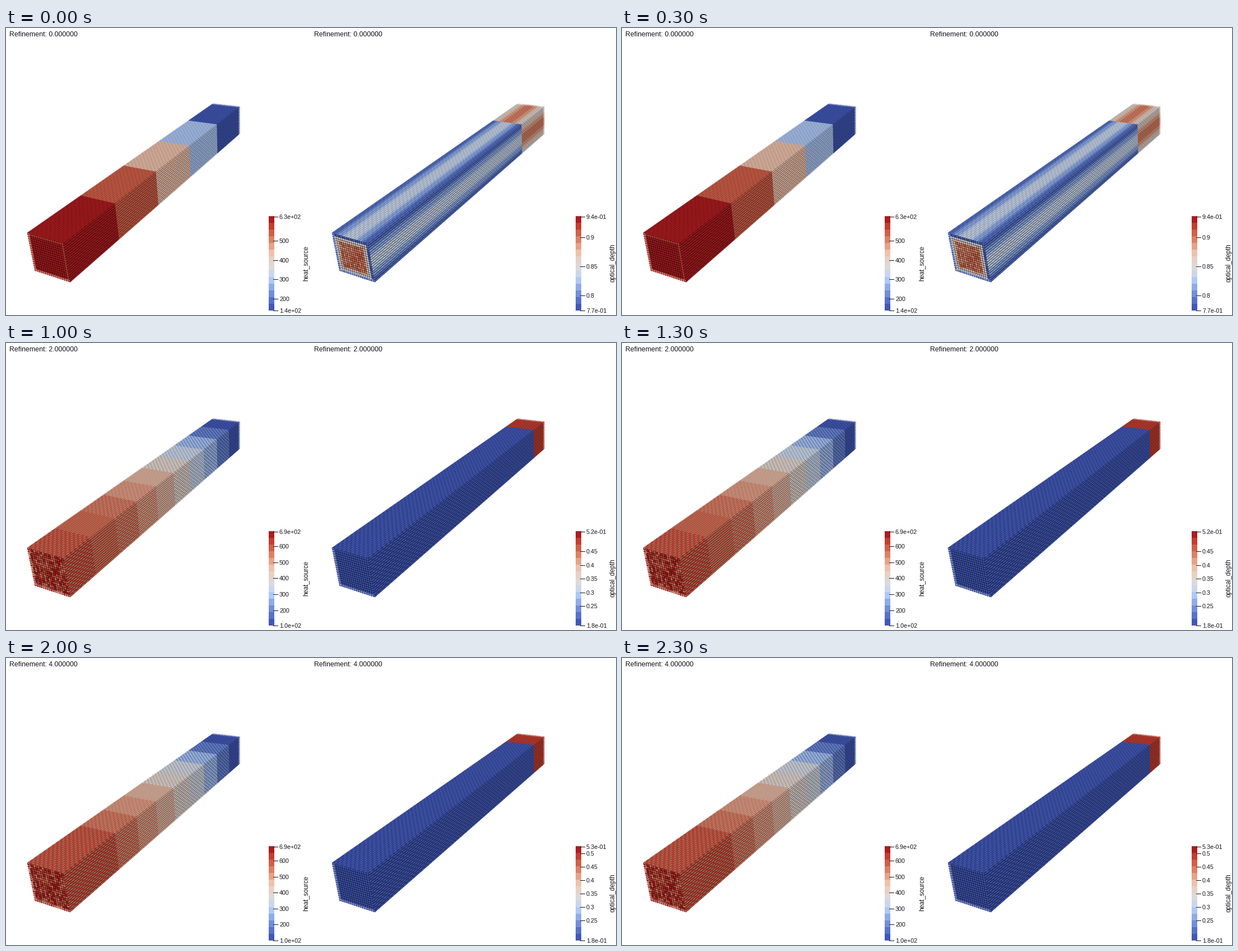
Recreate the animation shown at these times as a matplotlib script. Size 1089 by 514 pixels, loop 2.5 s.

```python
import numpy as np
import matplotlib.pyplot as plt
from matplotlib.animation import FuncAnimation
from matplotlib.patches import Rectangle

W, H, DPI = 1089, 514, 64
X0, X1, Y0, Y1 = 30, 426, 128, 462      # region holding one rod bundle
SS = 3                                  # supersampling
RODS, BANDS = 17, 14
PANEL_SHIFT = 544
INK = "#14141c"
plt.rcParams["font.family"] = "Liberation Sans"

ANCHORS = np.array([
    (66, 88, 182), (92, 122, 206), (132, 160, 224), (172, 200, 248),
    (208, 218, 234), (226, 216, 208), (240, 200, 180), (228, 160, 132),
    (215, 115, 88), (200, 72, 54), (172, 28, 32)]) / 255
PALETTE = np.stack([np.interp(np.linspace(0, 10, BANDS), np.arange(11), ANCHORS[:, k])
                    for k in range(3)], axis=1)

# (low, high, tick step) for each refinement level
HEAT_RANGE = [(139, 627, 100), (101, 639, 100), (104, 694, 100),
              (103, 691, 100), (100, 692, 100)]
DEPTH_RANGE = [(.774, .9365, .05), (.3745, .528, .02), (.1786, .5235, .05),
               (.1786, .5235, .05), (.1763, .527, .05)]
# normalised optical depth: (edge, centre) of body, (edge, centre) of tip, cap centre
DEPTH_LOOK = [((.08, .36), (.45, .75), .75), ((.1, .24), (.62, .74), .42),
              ((.03, .03), (.9, .9), .05)]


def fit_camera():
    """Projective camera from a few box points (x, y, z, px, py)."""
    points = [(0, 0, 0, 37, 367), (1, 0, 0, 103, 386), (1, 1, 0, 114, 456),
              (0, 1, 0, 51, 435), (0, 0, 1, 370, 135), (1, 0, 1, 418, 140),
              (1, 1, 1, 418, 189), (0, 0, .4, 210, 246), (1, 0, .4, 267, 257),
              (1, 1, .4, 272, 317)]
    rows, rhs = [], []
    for x, y, z, px, py in points:
        rows.append([x, y, z, 1, 0, 0, 0, 0, -px * x, -px * y, -px * z])
        rows.append([0, 0, 0, 0, x, y, z, 1, -py * x, -py * y, -py * z])
        rhs += [px, py]
    solved = np.linalg.lstsq(np.array(rows, float), np.array(rhs, float), rcond=None)[0]
    return np.append(solved, 1).reshape(3, 4)


def unproject(matrix):
    """Face coordinates for every sample, and the mask of samples on the face."""
    px = X0 + (np.arange((X1 - X0) * SS) + .5) / SS
    py = Y0 + (np.arange((Y1 - Y0) * SS) + .5) / SS
    gx, gy = np.meshgrid(px, py)
    inv = np.linalg.inv(matrix)
    a, b, w = (r[0] * gx + r[1] * gy + r[2] for r in inv)
    a, b = a / w, b / w
    mask = (a >= 0) & (a < 1) & (b >= 0) & (b < 1)
    return a[mask], b[mask], mask


camera = fit_camera()
cx, cy, cz, c1 = camera.T
FRONT = unproject(np.column_stack([cx, cy, c1]))
TOP = unproject(np.column_stack([cx, cz, c1]))
SIDE = unproject(np.column_stack([cy, cz, c1 + cx]))
CAP_NOISE = np.random.default_rng(4).uniform(-1, 1, (RODS, RODS))


def colour(n):
    return PALETTE[np.clip((n * BANDS).astype(int), 0, BANDS - 1)]


def heat(z, level):
    layers = 5 if level == 0 else 10
    centre = (np.floor(z * layers) + .5) / layers
    lo, hi, _ = HEAT_RANGE[level]
    n = (60 + 580 * np.cos(np.pi / 2 * centre) - lo) / (hi - lo)
    return np.clip(n, 0, 1) * (.93 if level < 2 else .9)


def depth(z, ring, level):
    layers = 5 if level == 0 else 10
    body, tip, _ = DEPTH_LOOK[min(level, 2)]
    t = np.clip(ring / 6, 0, 1)
    return np.where(z < 1 - 1 / layers, body[0] + (body[1] - body[0]) * t,
                    tip[0] + (tip[1] - tip[0]) * t)


def paint_length(image, face, kind, level, dark, gain):
    """Rods seen from the side: bright ridges, dark gaps, fine axial cells."""
    across, z, mask = face
    rod = np.floor(across * RODS)
    ridge = np.sin(np.pi * (across * RODS - rod))
    tone = np.where((np.floor(z * 130) + rod) % 2, 1, -1)
    if kind == "heat":
        n = heat(z, level)
        if level >= 2:
            n = n * (1 + .08 * tone)
    else:
        n = depth(z, np.minimum(rod, RODS - 1 - rod), level)
    light = (dark + gain * ridge) * (1 + (.05 if level < 2 else .1) * tone)
    rgb = np.clip(colour(n) * light[:, None], 0, 1)
    solid = z < 1 - .018 * (1 - ridge)
    image[mask] = np.column_stack([rgb, solid])


def paint_caps(image, kind, level):
    u, v, mask = FRONT
    i, j = (u * RODS).astype(int), (v * RODS).astype(int)
    radius = np.hypot(u * RODS - i - .5, v * RODS - j - .5) / .5
    ring = np.minimum(np.minimum(i, RODS - 1 - i), np.minimum(j, RODS - 1 - j))
    noise = CAP_NOISE[j, i]
    if kind == "heat":
        n = np.where(ring == 0, .9, .97) if level < 2 else .86 + .12 * noise
    else:
        centre = DEPTH_LOOK[min(level, 2)][2]
        n = np.interp(ring, [0, 1, 3], [.06, .06 + (centre - .06) * .55, centre])
        n = n + .07 * noise * (level < 2)
    disc = radius < .92
    light = np.where(disc, 1 - .35 * radius ** 2, .36)
    rgb = colour(np.clip(n, 0, 1)) * light[:, None]
    outer = (i == 0) | (j == RODS - 1)
    image[mask] = np.column_stack([rgb, disc | ~outer])


def render(kind, level):
    image = np.zeros(((Y1 - Y0) * SS, (X1 - X0) * SS, 4))
    paint_length(image, TOP, kind, level, .68, .24)
    paint_length(image, SIDE, kind, level, .34, .56)
    paint_caps(image, kind, level)
    alpha = image[..., 3:]
    on_white = image[..., :3] * alpha + 1 - alpha
    return on_white.reshape(Y1 - Y0, SS, X1 - X0, SS, 3).mean(axis=(1, 3))


fig = plt.figure(figsize=(W / DPI, H / DPI), dpi=DPI, facecolor="white")
ax = fig.add_axes([0, 0, 1, 1])


def label(x, y, text, px, **kw):
    ax.text(x, y, text, fontsize=px * 72 / DPI, color=INK, **kw)


def colour_bar(x, limits, name):
    top, bottom = 337, 506
    lo, hi, step = limits
    height = (bottom - top) / BANDS
    for k, rgb in enumerate(PALETTE):
        ax.add_patch(Rectangle((x, bottom - (k + 1) * height), 10, height,
                               fc=rgb, ec="none", antialiased=False))

    def tick(y, text):
        ax.plot([x + 8, x + 15.5], [y, y], color=INK, lw=72 / DPI)
        label(x + 19, y, text, 10.8, va="center_baseline")

    tick(top + .5, f"{hi:.1e}")
    tick(bottom - .5, f"{lo:.1e}")
    for k in range(int(lo / step), int(hi / step) + 1):
        y = bottom - (k * step - lo) / (hi - lo) * (bottom - top)
        if top + 12 < y < bottom - 12:
            tick(y, f"{k * step:g}")
    label(x + 66, 421, name, 11.5, rotation=90, ha="center", va="center")


PANELS = [("heat", 0, 469, HEAT_RANGE, "heat_source"),
          ("depth", PANEL_SHIFT, 1017, DEPTH_RANGE, "optical_depth")]
IMAGES = {(p[0], level): render(p[0], level) for p in PANELS for level in range(5)}


def draw(level):
    ax.clear()
    for kind, shift, bar_x, ranges, name in PANELS:
        ax.imshow(IMAGES[kind, level], extent=(X0 + shift, X1 + shift, Y1, Y0),
                  interpolation="nearest", aspect="auto")
        label(6 + shift, 15, f"Refinement: {level:.6f}", 12.4)
        # the right-hand caption sits slightly closer to its bar
        colour_bar(bar_x, ranges[level], name) if shift == 0 else \
            colour_bar(bar_x, ranges[level], name)
    ax.set_xlim(0, W)
    ax.set_ylim(H, 0)
    ax.axis("off")
    return ax.get_children()


animation = FuncAnimation(fig, draw, frames=5, init_func=lambda: [], interval=500,
                          repeat=True, repeat_delay=0, blit=False)
plt.show()
```
